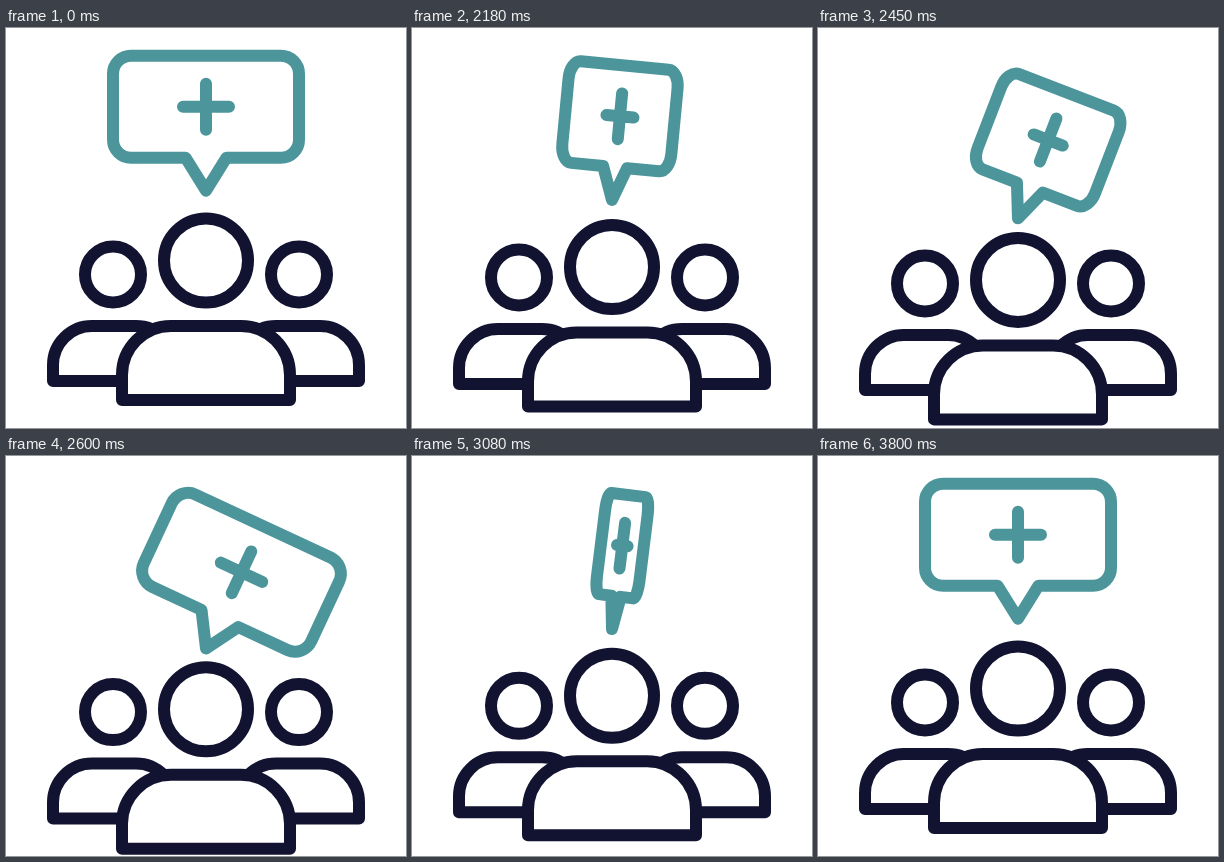
Recreate the animation shown at these times as an HTML page with a canvas. Size 400 px wide and 400 px high, loop 3.83 s.

```html
<!DOCTYPE html>
<html lang="en">
<head>
<meta charset="utf-8">
<title>Team message</title>
<style>
  html, body { margin: 0; width: 100%; height: 100%; overflow: hidden; background: #fff; }
  canvas { display: block; width: 400px; height: 400px; }
</style>
</head>
<body>
<canvas id="stage" width="400" height="400"></canvas>
<script>
const ctx = document.getElementById('stage').getContext('2d');
const NAVY = '#121331', TEAL = '#4b959b';
const LOOP = 3830, STEP = 30;
const START = 2000, LOW = 2600, SWAY = 3350, END = 3800;

// Cubic Bezier easing, solved by bisection
function bezier(x1, y1, x2, y2) {
  const at = (a, b, s) => 3 * a * s * (1 - s) ** 2 + 3 * b * s * s * (1 - s) + s ** 3;
  return x => {
    let lo = 0, hi = 1;
    for (let i = 0; i < 24; i++) {
      const mid = (lo + hi) / 2;
      if (at(x1, x2, mid) < x) lo = mid; else hi = mid;
    }
    return at(y1, y2, (lo + hi) / 2);
  };
}

const smooth = bezier(0.33, 0, 0.67, 1);
const sink = bezier(0.33, 0, 0.4, 1);
const rise = bezier(0.33, 0, 0.2, 1);
const swing = bezier(0.5, 0, 0.755, 1);
const whirl = bezier(0.2, 0.295, 0.63, 1);

function progress(t, from, to, ease) {
  if (t <= from) return 0;
  return t >= to ? 1 : ease((t - from) / (to - from));
}

const bobAt = t => progress(t, START, LOW, sink) - progress(t, LOW, END, rise);
const spinAt = t => 2 * Math.PI * progress(t, START, END, whirl);
const tiltAt = t => Math.PI / 180 * (
  25 * progress(t, START, LOW, smooth)
  - 31.4 * progress(t, LOW, SWAY, swing)
  + 6.4 * progress(t, SWAY, END, smooth));

function head(x, y, r) {
  ctx.beginPath();
  ctx.arc(x, y, r, 0, 2 * Math.PI);
  ctx.stroke();
}

function sidePerson(dy, flip) {
  ctx.save();
  if (flip) {
    ctx.translate(400, 0);
    ctx.scale(-1, 1);
  }
  ctx.translate(0, dy);
  head(107, 246.5, 28);
  ctx.beginPath();
  ctx.moveTo(116, 353);
  ctx.lineTo(47, 353);
  ctx.lineTo(47, 337);
  ctx.arcTo(47, 298, 86, 298, 39);
  ctx.arc(130, 337, 39, -Math.PI / 2, -Math.PI / 4);
  ctx.stroke();
  ctx.restore();
}

function mainPerson(dy) {
  ctx.save();
  ctx.translate(0, dy);
  head(200, 232.5, 42);
  ctx.beginPath();
  ctx.moveTo(116, 372);
  ctx.arcTo(116, 298, 200, 298, 49);
  ctx.arcTo(284, 298, 284, 372, 49);
  ctx.lineTo(284, 372);
  ctx.closePath();
  ctx.fill();
  ctx.stroke();
  ctx.restore();
}

// Drawn around the tip; the squeeze narrows the path but not the line
function bubble(dy, tilt, squeeze) {
  ctx.save();
  ctx.translate(200, 162.7 + dy);
  ctx.rotate(tilt);
  ctx.save();
  ctx.scale(Math.max(Math.abs(squeeze), 0.002), 1);
  ctx.beginPath();
  ctx.moveTo(0, 0);
  ctx.lineTo(-20.5, -33);
  ctx.arcTo(-93, -33, -93, -84, 18);
  ctx.arcTo(-93, -135, 0, -135, 18);
  ctx.arcTo(93, -135, 93, -84, 18);
  ctx.arcTo(93, -33, 20.5, -33, 18);
  ctx.lineTo(20.5, -33);
  ctx.closePath();
  ctx.moveTo(-23, -84);
  ctx.lineTo(23, -84);
  ctx.moveTo(0, -107);
  ctx.lineTo(0, -61);
  ctx.restore();
  ctx.stroke();
  ctx.restore();
}

function draw(t) {
  const bob = bobAt(t);
  ctx.fillStyle = '#fff';
  ctx.fillRect(0, 0, 400, 400);
  ctx.lineWidth = 12;
  ctx.lineCap = ctx.lineJoin = 'round';
  ctx.strokeStyle = NAVY;
  sidePerson(9.6 * bob, false);
  sidePerson(9.6 * bob, true);
  mainPerson(20.8 * bob);
  ctx.strokeStyle = TEAL;
  bubble(29.7 * bob, tiltAt(t), Math.cos(spinAt(t)));
}

const origin = performance.now();

function tick() {
  const t = (performance.now() - origin) % LOOP;
  draw(START + Math.floor((t - START) / STEP) * STEP);
  requestAnimationFrame(tick);
}
tick();
</script>
</body>
</html>
```
